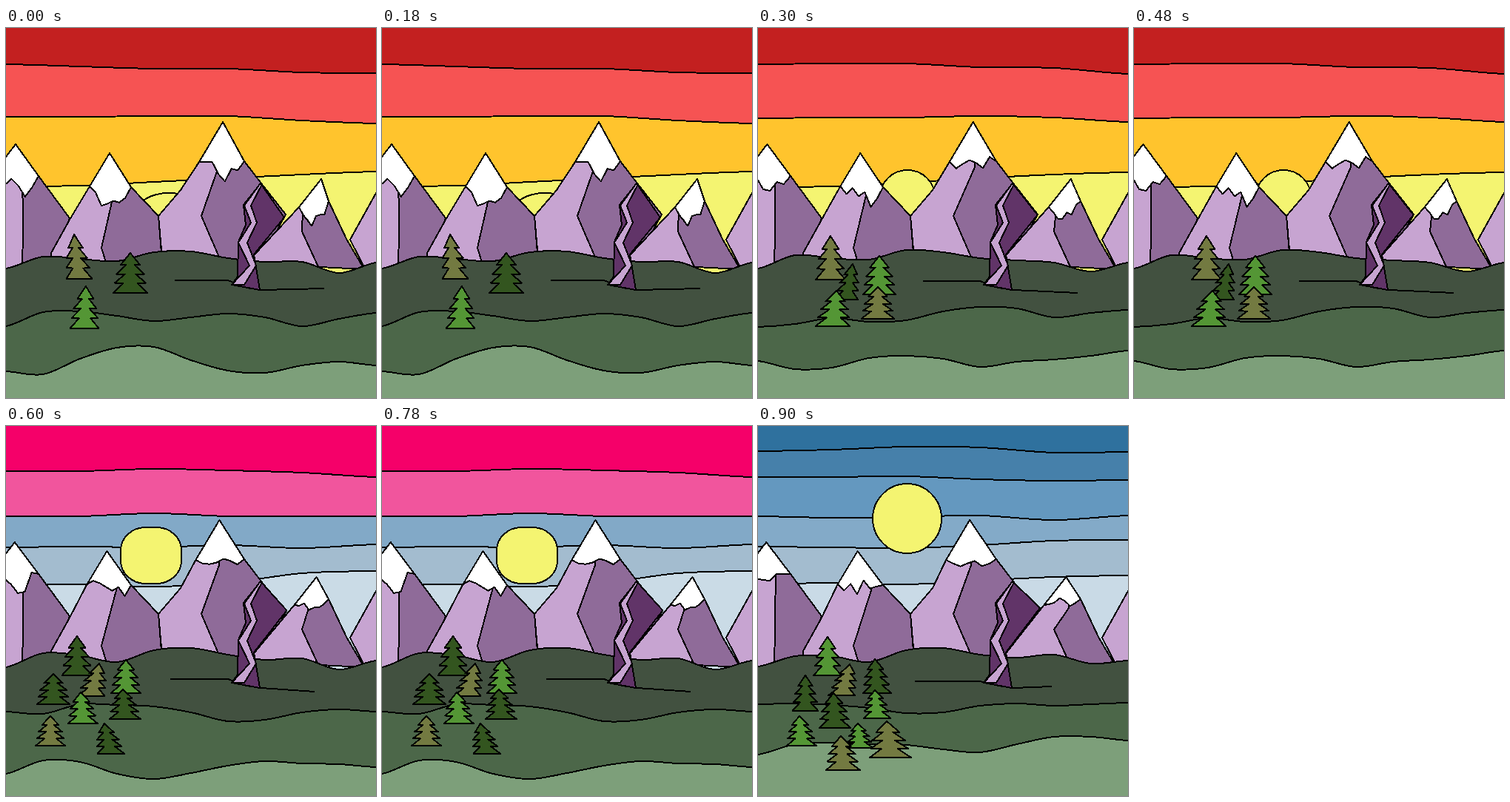
Recreate the animation shown at these times as an HTML page. Size 500 by 500 pixels, loop 1200 ms.

```html
<!DOCTYPE html>
<html lang="en">
<head>
<meta charset="utf-8">
<title>Mountain sunrise</title>
<style>
html, body { margin: 0; width: 100%; height: 100%; overflow: hidden; }
svg { display: block; width: 100%; height: 100%; }
g { visibility: hidden; }
path, rect { stroke: #000; stroke-width: 2; stroke-linejoin: round; shape-rendering: crispEdges; }
</style>
</head>
<body>
<svg id="stage" viewBox="0 0 500 500"></svg>
<script>
const POSES = 4, POSE_MS = 300;
const LIGHT = '#c7a4d1', SHADE = '#8f6b99', DEEP = '#613468', YELLOW = '#f4f471';
const OLIVE = '#737a41', DARK = '#33551f', GREEN = '#549635';

const path = (fill, d) => `<path fill="${fill}" d="${d}"/>`;
const poly = (fill, points) => path(fill, `M${points.join(' ')}Z`);

// Smooth line across the stage through evenly spaced heights, filled below
function band(fill, ys) {
  const step = 500 / (ys.length - 1);
  const slope = i => ((ys[i + 1] ?? ys[i]) - (ys[i - 1] ?? ys[i])) / 6;
  let d = `M-9 510V${ys[0]}H0`;
  for (let i = 1; i < ys.length; i++) {
    const x = i * step;
    d += `C${[x - step * 2 / 3, ys[i - 1] + slope(i - 1), x - step / 3, ys[i] - slope(i), x, ys[i]]}`;
  }
  return path(fill, d + 'h9V510Z');
}

// Skies: backdrop, then colour and heights of each band
const ember = ['#c32020',
  ['#f65353', [49, 52, 55, 55, 60, 61]],
  ['#ffc42d', [120, 120, 119, 119, 125, 129]],
  [YELLOW, [214, 213, 208, 203, 198, 194]]];
const glow = ['#c32020',
  ['#f65353', [49, 48, 48, 53, 54, 62]],
  ['#ffc42d', [122, 121, 121, 119, 121, 127]],
  [YELLOW, [215, 214, 209, 203, 198, 195]]];
const pink = ['#f50069',
  ['#f1559d', [61, 61, 58, 60, 63, 69]],
  ['#82a9c7', [122, 122, 118, 122, 122, 122]],
  ['#a3bccf', [164, 163, 164, 161, 165, 160]],
  ['#cadbe6', [214, 214, 217, 212, 199, 196]]];
const blue = ['#2f719e',
  ['#4680aa', [34, 32, 28, 29, 36, 35]],
  ['#6498bf', [69, 69, 68, 72, 74, 73]],
  ['#83aac8', [122, 124, 123, 121, 127, 121]],
  ['#a3bccf', [163, 164, 165, 161, 155, 154]],
  ['#c9dae6', [214, 212, 214, 209, 204, 202]]];
const skies = [ember, glow, pink, blue];

const sky = ([top, ...bands]) => `<rect x="-9" y="-9" width="520" height="520" fill="${top}"/>`
  + bands.map(b => band(...b)).join('');

// Centre, radii and roundness
const suns = [[220, 250, 44, 27, 1], [202, 228, 37, 36, 1], [196, 175, 41, 38, .82], [201.5, 125, 46.5, 47, 1]];

const sun = ([x, y, rx, ry, k]) => `<rect x="${x - rx}" y="${y - ry}" width="${2 * rx}" height="${2 * ry}"
  rx="${rx * k}" ry="${ry * k}" fill="${YELLOW}"/>`;

// Slopes run downwards from the snow line; crest and rim hold one entry per pose
const west = {
  drift: -.6, top: [13, 157],
  left: [[-20, 200], [-20, 340]],
  right: [[44, 200], [86, 257], [60, 340]],
  crest: [22, 23, 23, 24], ridge: [198, [23, 260], [22, 340]],
  rim: [[12, 12, 4, 13, 28, 16], [2, 2, 18, 20, 8, 11], [6, 6, 14, 26, 24, -2], [4, 6, 8, 9, 0, 0]]
};
const twin = {
  drift: -1.8, top: [140, 169],
  left: [[113, 214], [86, 259], [61, 304], [60, 330]],
  right: [[169, 215], [206, 254], [212, 330]],
  crest: [146, 147, 149, 153], ridge: [222, [129, 297], [136, 320]],
  rim: [[8, 26, 23, 19, 21, 15], [10, 2, 13, 7, 27, 16], [-5, -2, 3, 8, 3, 15], [8, -1, 13, -6, 5, 2]]
};
const high = {
  drift: -2.3, top: [293, 127],
  left: [[261, 181], [236, 219], [206, 254], [210, 300], [212, 330]],
  right: [[322, 180], [345, 210], [378, 252], [335, 330]],
  crest: [287, 293, 288, 288], ridge: [188, [264, 254], [289, 312]],
  rim: [[0, 0, 17, 27, 10, 12], [9, 3, -2, 2, 9, -6], [5, 6, 4, -1, 2, 7], [5, 9, 5, 2, 9, 6]]
};
const east = {
  drift: -3.2, top: [426, 204],
  left: [[396, 242], [336, 306], [325, 318]],
  right: [[436, 234], [460, 285], [484, 326]],
  crest: [401, 403, 409, 420], ridge: [246, [400, 275], [424, 327]],
  rim: [[12, 20, 29, 17, 16, 17], [8, 18, 19, 12, 16, 4], [2, 0, 10, 8, 9, 6], [0, -1, -6, -1, 7, 4]]
};

function peak({ drift, top, left, right, crest, ridge, rim }, pose) {
  const move = ([x, y]) => [x + drift * pose, y];
  const summit = move(top), a = move(left[0]), b = right[0];
  const west = [...left.slice(1).reverse(), a, summit];
  const [crestY, ...rest] = ridge;
  const teeth = rim[pose].map((depth, i) => {
    const u = (i + 1) / 7;
    return [a[0] + (b[0] - a[0]) * u, a[1] + (b[1] - a[1]) * u + depth];
  });
  return poly(SHADE, [...west, ...right])
    + poly(LIGHT, [...west, [crest[pose], crestY], ...rest])
    + poly('#fff', [summit, a, ...teeth, b]);
}

// Hills: heights per pose, from back to front
const back = [
  [325, 309, 312, 315, 303, 302, 311, 316, 316, 331, 317],
  [325, 307, 311, 313, 300, 303, 311, 314, 317, 329, 317],
  [326, 307, 310, 319, 303, 300, 309, 316, 314, 329, 317],
  [325, 311, 311, 319, 303, 300, 309, 313, 309, 321, 317]];
const middle = [
  [403, 384, 383, 389, 396, 391, 386, 391, 403, 393, 385],
  [404, 400, 392, 397, 395, 383, 377, 379, 391, 385, 381],
  [386, 389, 376, 377, 379, 387, 399, 397, 387, 383, 386],
  [376, 375, 377, 381, 388, 387, 378, 375, 378, 376, 374]];
const front = [
  [464, 468, 447, 432, 431, 449, 463, 466, 456, 451, 456],
  [450, 461, 459, 446, 443, 447, 458, 451, 448, 443, 436],
  [470, 452, 454, 470, 477, 469, 459, 453, 456, 457, 461],
  [444, 430, 428, 430, 431, 437, 441, 430, 420, 420, 425]];

// Both ends of the line at the foot of the cliff
const ground = [[228, 341, 430, 352], [223, 342, 432, 358], [222, 342, 417, 359], [212, 345, 397, 352]];

// Left bank and width of the stream
const stream = [[343, 211, 3], [322, 240, 9], [331, 263, 8], [314, 290, 12], [329, 321, 9], [305, 347, 17]];

function cliff(pose) {
  const [x, y, endX, endY] = ground[pose];
  const banks = [...stream.map(([x, y]) => [x, y]), ...stream.map(([x, y, w]) => [x + w, y]).reverse()];
  const rock = [[344, 210], [321, 239], [324, 266], [314, 289], [313, 336], [305, 347],
    [343, 354], [335, 306], [376 + 1.7 * pose, 256 - 3.4 * pose]];
  return path('none', `M${x} ${y}L300 ${y}L325 351L345 354L${endX} ${endY}`)
    + poly(DEEP, rock) + poly(LIGHT, banks);
}

// Trees: colour, tip, width, height and lean
const grove = [
  [[OLIVE, 92, 279, 35, 60, 7], [DARK, 168, 304, 47, 54], [GREEN, 108, 349, 39, 57, -2]],
  [[OLIVE, 98, 281, 40, 59], [DARK, 128, 319, 32, 48, -9], [GREEN, 164, 308, 45, 52],
    [OLIVE, 162, 350, 45, 43], [GREEN, 106, 355, 47, 48, -5]]];
const wood = [
  [[DARK, 96, 284, 41, 53], [OLIVE, 126, 321, 37, 44, -11], [GREEN, 162, 316, 40, 45],
    [DARK, 64, 335, 45, 41], [GREEN, 101, 360, 40, 42, 3], [DARK, 158, 356, 42, 40, 3],
    [OLIVE, 60, 392, 40, 40], [DARK, 133, 402, 37, 41, 9]],
  [[GREEN, 94, 285, 38, 52], [OLIVE, 124, 322, 36, 42, -11], [DARK, 158, 315, 38, 46, 3],
    [DARK, 64, 337, 35, 48], [GREEN, 158, 357, 37, 38, 3], [DARK, 102, 361, 43, 47, 2],
    [GREEN, 56, 392, 40, 40, 3], [GREEN, 135, 402, 35, 33, 3], [OLIVE, 174, 399, 56, 49, 5],
    [OLIVE, 112, 419, 46, 46, 3]]];
const trees = [...grove, ...wood];

// Right side of a fir in a unit box
const FIR = [[.28, .3], [.12, .3], [.4, .53], [.15, .53], [.45, .75], [.2, .76], [.5, 1]];

function tree([fill, x, y, w, h, lean = 0]) {
  const mirrored = FIR.map(([u, v]) => [-u, v]).reverse();
  return poly(fill, [[0, 0], ...FIR, ...mirrored].map(([u, v]) => [x + lean * v + u * w, y + v * h]));
}

const draw = pose => [
  sky(skies[pose]),
  sun(suns[pose]),
  ...[west, twin, high, east].map(m => peak(m, pose)),
  poly(LIGHT, [[510, 206], [500, 223], [465, 286], [485, 325], [510, 325]]),
  band('#425140', back[pose]),
  band('#4c6749', middle[pose]),
  band('#7d9f7a', front[pose]),
  cliff(pose),
  ...trees[pose].map(tree)
].join('');

const stage = document.getElementById('stage');
stage.innerHTML = Array.from({ length: POSES }, (_, i) => `<g>${draw(i)}</g>`).join('');
const layers = [...stage.children];
const start = performance.now();

function show(now) {
  const current = Math.floor(Math.max(0, now - start) / POSE_MS) % POSES;
  layers.forEach((g, i) => g.style.visibility = i === current ? 'visible' : 'hidden');
  requestAnimationFrame(show);
}
show(start);
</script>
</body>
</html>
```
